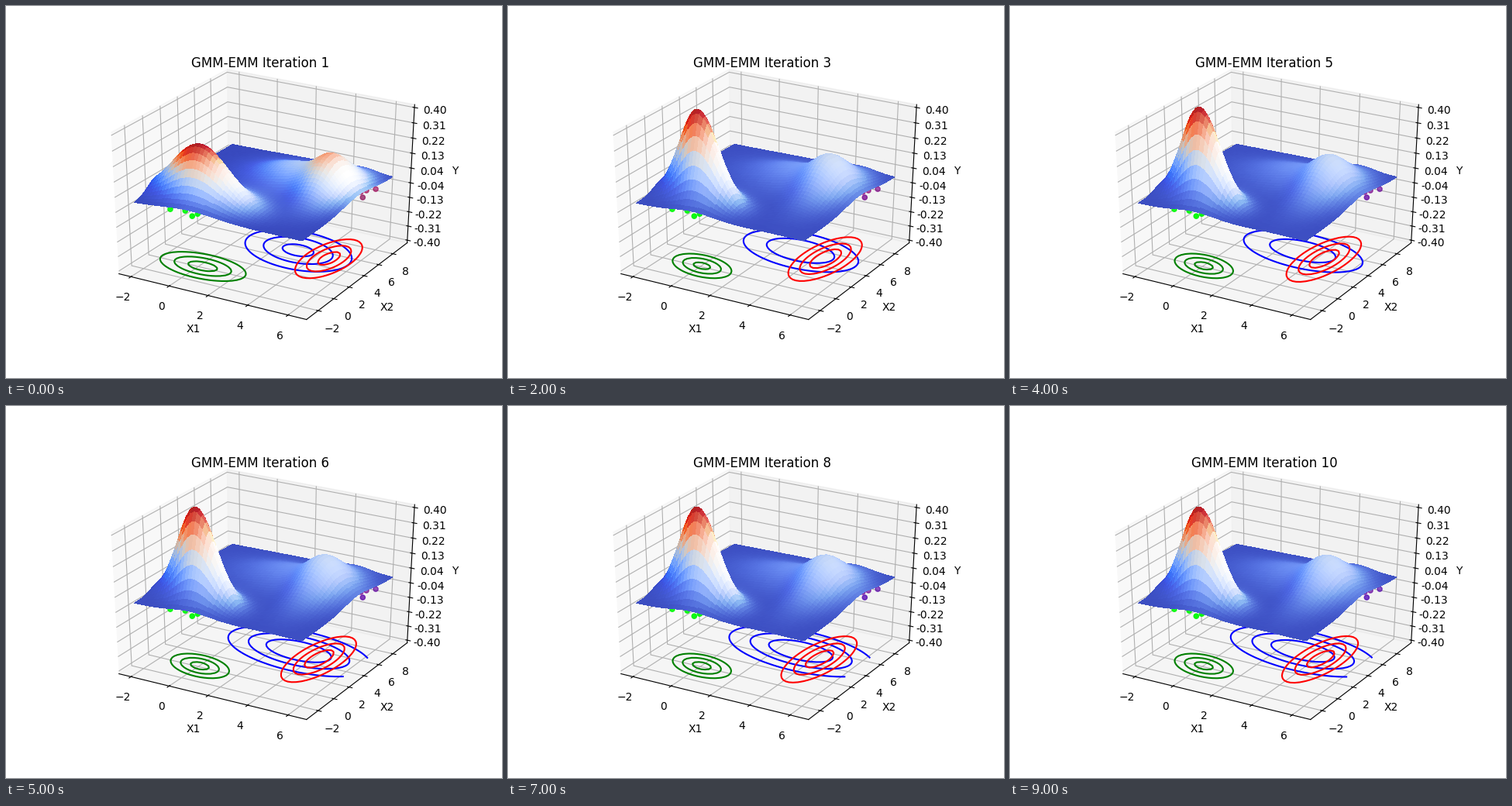
These frames come from a looping animation (640 px wide and 480 px high, 10000 ms). A matplotlib script:

```python
import numpy as np
import matplotlib.pyplot as plt
from matplotlib.animation import FuncAnimation
from matplotlib.colors import LightSource

X_MID, X_SPAN = 2.13, 8.32
Y_MID, Y_SPAN = 3.30, 11.80
FLOOR = -0.4

# per component: first fit, settled fit (mean x, mean y, std x, std y, correlation),
# share of the remaining gap kept per iteration, height on the surface
FITS = {
    "green": ((0.31, -0.17, 1.40, 1.10, -0.12), (0.17, -0.20, 1.00, 0.97, -0.26), 0.20, 3.13),
    "blue": ((3.12, 5.07, 1.77, 1.83, -0.18), (3.18, 5.00, 2.37, 1.79, -0.20), 0.72, 2.4),
    "red": ((4.78, 4.92, 0.70, 2.20, 0.0), (4.27, 4.40, 0.68, 2.68, 0.0), 0.78, 1.4),
}


def params(name, i):
    first, last, keep, _ = FITS[name]
    first, last = np.array(first), np.array(last)
    return last + (first - last) * keep ** i


def density(x, y, p):
    mx, my, sx, sy, r = p
    u, v = (x - mx) / sx, (y - my) / sy
    q = (u * u - 2 * r * u * v + v * v) / (1 - r * r)
    return np.exp(-q / 2) / (2 * np.pi * sx * sy * np.sqrt(1 - r * r))


def sample(rng, name, n):
    mx, my, sx, sy, r = params(name, 9)
    cov = [[sx * sx, r * sx * sy], [r * sx * sy, sy * sy]]
    pts = rng.multivariate_normal((mx, my), cov, n)
    x, y = pts.T
    return pts[(x > -1.9) & (x < 5.8) & (y > -1.9) & (y < 8.9)]


rng = np.random.default_rng(4)
rim = [(-0.31, -2.34), (0.92, -2.61), (0.34, -2.09), (0.99, -2.14),
       (6.29, 6.88), (6.25, 5.24), (6.01, 6.38), (5.88, 5.98)]
px, py = np.vstack([rim, sample(rng, "green", 110), sample(rng, "blue", 100),
                    sample(rng, "red", 60)]).T

t = np.linspace(-0.5, 0.5, 50)
gx, gy = np.meshgrid(X_MID + X_SPAN * t, Y_MID + Y_SPAN * t)
light = LightSource(azdeg=90, altdeg=45)

fig = plt.figure(figsize=(6.4, 4.8), dpi=100)
ax = fig.add_subplot(projection="3d", computed_zorder=False)
ax.apply_aspect = lambda position=None: None  # keep the wide axes box
ax.set_box_aspect((1, 1, 1), zoom=3 ** 0.5 / 1.8294640721620434)
ax.view_init(30, -60)

pad = 25 / 48
ax.set_xlim(X_MID - 1.1 * X_SPAN * pad, X_MID + 1.1 * X_SPAN * pad)
ax.set_ylim(Y_MID - 1.1 * Y_SPAN * pad, Y_MID + 1.1 * Y_SPAN * pad)
ax.set_zlim(-0.8 * pad, 0.8 * pad)
ax.set_xticks(range(-2, 7, 2))
ax.set_yticks(range(-2, 9, 2))
zt = np.linspace(-0.4, 0.4, 10)
ax.set_zticks(zt, [f"{z:.2f}" for z in zt])
ax.set_autoscale_on(False)
ax.set_xlabel("X1")
ax.set_ylabel("X2")
ax.set_zlabel("Y")
ax.set_title("", y=1)
ax.title.set_y(0.92)

drawn = []


def point_colors(i):
    share = np.array([density(px, py, params(c, i)) for c in ("red", "green", "blue")])
    share = share ** 0.4  # soft assignment
    return (share / share.sum(axis=0)).T.clip(0, 1)


def update(i):
    while drawn:
        drawn.pop().remove()
    ax.title.set_text(f"GMM-EMM Iteration {i + 1}")
    drawn.append(ax.scatter(px, py, 0 * px, c=point_colors(i - 1), s=20, zorder=2))

    total = 0
    for name, fit in FITS.items():
        p = params(name, i)
        total = total + fit[3] * density(gx, gy, p)
        drawn.append(ax.contour(gx, gy, density(gx, gy, p), 3, zdir="z",
                                offset=FLOOR, colors=name, zorder=1))
    rgb = light.shade(total, cmap=plt.cm.coolwarm, blend_mode="overlay")
    drawn.append(ax.plot_surface(gx, gy, total, facecolors=rgb, shade=False,
                                 linewidth=0, antialiased=False, zorder=3))
    return drawn


anim = FuncAnimation(fig, update, frames=10, interval=1000, repeat=True,
                     init_func=lambda: update(0))
plt.show()
```
